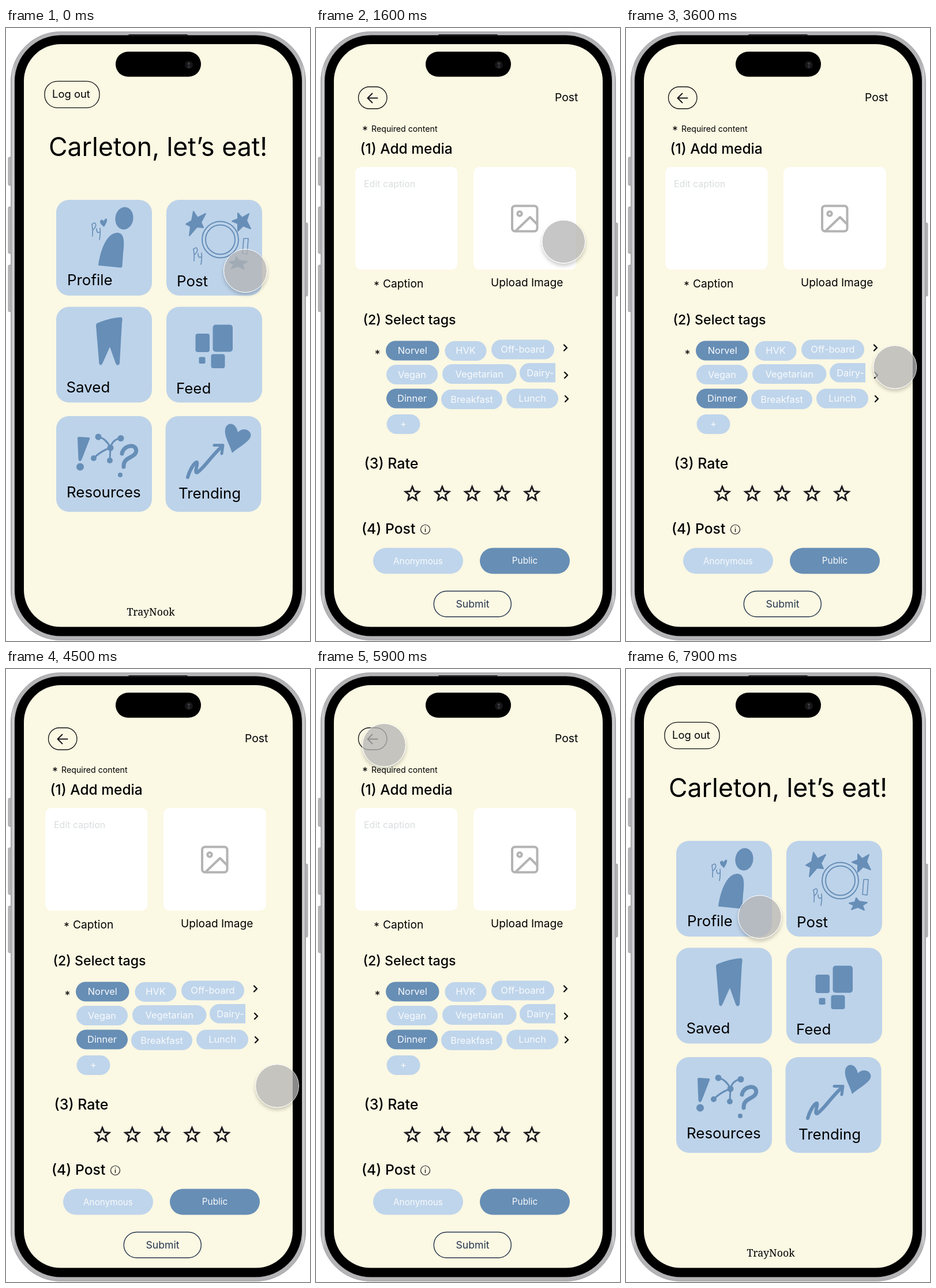
An HTML page that plays this animation: 527 px wide and 1063 px high, repeating every 8 s.

```html
<!DOCTYPE html>
<html lang="en">
<head>
<meta charset="utf-8">
<title>Campus dining app</title>
<style>
  html, body { margin: 0; width: 100%; height: 100%; overflow: hidden; background: #fff; }
  svg { position: absolute; left: 0; top: 0; display: block; }
  text { font-family: Inter, "Liberation Sans", sans-serif; white-space: pre; }
  .serif { font-family: "Noto Serif", "Liberation Serif", serif; }
  .line { fill: none; stroke-linecap: round; stroke-linejoin: round; }
  #touch {
    position: absolute; left: -38px; top: -38px; width: 76px; height: 76px;
    box-sizing: border-box; border-radius: 50%; border: 1.5px solid #fff;
    background: rgba(181, 181, 181, .76); background-clip: padding-box;
    box-shadow: 0 4px 6px rgba(0, 0, 0, .2);
  }
</style>
</head>
<body>
<svg width="527" height="1063" viewBox="0 0 527 1063">
  <defs>
    <linearGradient id="metal">
      <stop offset="0" stop-color="#a3a3a5"/>
      <stop offset=".007" stop-color="#d5d5d7"/>
      <stop offset=".013" stop-color="#b4b4b6"/>
      <stop offset=".987" stop-color="#b4b4b6"/>
      <stop offset=".993" stop-color="#d5d5d7"/>
      <stop offset="1" stop-color="#a3a3a5"/>
    </linearGradient>
    <clipPath id="tagRow"><rect x="100" y="570" width="315" height="60"/></clipPath>
    <g id="py" class="line" stroke="#668eb7" stroke-width="1.6">
      <path d="M0 2 Q2 13 1 23 M0 3 C5 -4 11 3 2 12 M8 10 Q8 19 13 16 M14 9 Q15 18 13 29"/>
    </g>
  </defs>

  <g id="phone">
    <g fill="#b7b7b9" stroke="#929294" stroke-width=".8">
      <rect x="4" y="224" width="8" height="49" rx="2"/>
      <rect x="4" y="310" width="8" height="81" rx="2"/>
      <rect x="4" y="411" width="8" height="81" rx="2"/>
      <rect x="515" y="338" width="8" height="127" rx="2"/>
    </g>
    <rect x="8.5" y="6.5" width="511" height="1055" rx="86" fill="url(#metal)" stroke="#a0a0a2"/>
    <rect x="15" y="12.5" width="498" height="1042" rx="80"/>
    <rect x="212" y="11" width="103" height="3" rx="1.5" fill="#1c1c1e"/>
    <rect x="31" y="28" width="466" height="1010.5" rx="64" fill="#fbf8e3"/>
    <rect x="190" y="41" width="148" height="43.5" rx="21.7"/>
    <circle cx="317" cy="64" r="7" fill="#161618"/>
    <circle cx="317" cy="62" r="2" fill="#3f4046"/>
    <circle cx="317" cy="67" r="2" fill="#333439"/>
  </g>

  <g id="home">
    <rect x="67" y="92.3" width="95" height="46" rx="22" fill="none" stroke="#111" stroke-width="1.3"/>
    <g id="tiles" fill="#bdd3ea"></g>
    <g id="icons" fill="#668eb7">
      <ellipse cx="205" cy="330" rx="15.5" ry="19.5" transform="rotate(8 205 330)"/>
      <path d="M160 411 C164 384 174 357 192 355 C207 354 205 375 203 391 L201.5 413 Q201 416 198 415.500 L163 412 Q159.500 412 160 411Z"/>
      <path d="M170 345 C165 341 161 337 164 333.500 Q167 331 169.500 335 Q172 329 175 331 C176 336 172 341 170 345Z"/>
      <use href="#py" x="149" y="338"/>
      <use href="#py" x="325" y="381"/>
      <g stroke="#668eb7" stroke-width="2" stroke-linejoin="round">
        <path d="M325 318 L332 329 L346 322 L338 337 L342 346 L331 345 L318 360 L320 344 L312 340 L322 334Z"/>
        <path d="M402 321 L409 329 L421 322 L417 334 L424 348 L411 343 L402 352 L402 339 L392 335 L402 331Z"/>
        <path d="M399 397 L404 403 L418 405 L410 410 L413 418 L402 413 L391 417 L395 410 L387 406 L397 404Z"/>
      </g>
      <g class="line" stroke="#668eb7" stroke-width="2">
        <circle cx="371.5" cy="367" r="31.5"/>
        <circle cx="371.5" cy="367" r="25.5"/>
        <path d="M412 365 L420 365 L418 392 L410 391Z" stroke-width="1.6"/>
      </g>
      <path d="M156 516 Q156 512 160 511 Q180 503 199 501.5 Q203 502 201 510 L197 582 Q193 588 190 581 L180 553 L168 580 Q164 588 161.500 582Z"/>
      <rect x="328.5" y="530" width="24.5" height="32" rx="4"/>
      <rect x="358.5" y="514.5" width="34.5" height="47" rx="5"/>
      <rect x="334.5" y="570.5" width="11" height="11.5" rx="2"/>
      <rect x="355.5" y="565.5" width="24" height="24.5" rx="4"/>
      <path d="M124 711 Q124 709 127 709 L143 710 Q146 710 145 713 L131 749 Q127 754 125.500 748Z"/>
      <circle cx="128.5" cy="761" r="6.5"/>
      <circle cx="160" cy="709" r="5.5"/>
      <circle cx="199" cy="711.5" r="5.5"/>
      <circle cx="181" cy="728" r="5.5"/>
      <circle cx="152" cy="746" r="5"/>
      <circle cx="180" cy="750" r="5"/>
      <circle cx="198" cy="775" r="4"/>
      <g class="line" stroke="#668eb7">
        <path stroke-width="3" d="M160 709 Q174 712 181 728 L180 750 M199 711 Q184 714 181 728 Q165 733 152 746"/>
        <path stroke-width="7" d="M201 738 C204 722 228 720 225.500 735 C223 746 203 743 204 761"/>
        <path stroke-width="6" d="M315 779 C318 767 327 752 331 753 C333 757 326 771 331 771 C341 766 355 743 374 726"/>
        <path stroke-width="5" d="M361 723.500 L376 723.500 L374 738"/>
      </g>
      <path d="M392 737 C387 719 376 706 381 692 C387 682 399 686 402 701 C410 692 424 696 424.500 706 C424 717 404 726 392 737Z"/>
    </g>
  </g>

  <g id="post">
    <rect x="73.5" y="102" width="49.5" height="38" rx="19" fill="none" stroke="#111" stroke-width="1.3"/>
    <path class="line" d="M106.500 121.500 H90 M97.500 113.500 L89.500 121.500 L97.500 129.500" stroke="#1d1b20" stroke-width="2"/>
    <g fill="#fff">
      <rect x="68" y="241" width="177.5" height="178" rx="10"/>
      <rect x="273" y="241" width="178" height="178" rx="10"/>
    </g>
    <g class="line" stroke="#b3b3b3" stroke-width="4">
      <rect x="340" y="308.5" width="43.5" height="44" rx="5"/>
      <circle cx="353" cy="322" r="3.7"/>
      <path d="M346 352 L371 328 L383 340"/>
    </g>
    <g id="pills"></g>
    <path class="line" id="chevrons" stroke="#111" stroke-width="2.4"/>
    <g id="stars" fill="none" stroke="#1d1b20" stroke-width="2.8" stroke-miterlimit="10"></g>
    <circle cx="189.5" cy="869.5" r="8" fill="none" stroke="#1d1b20" stroke-width="1.2"/>
    <path class="line" d="M189.500 868.500 V873.500 M189.500 865.500 V865.600" stroke="#1d1b20" stroke-width="1.4"/>
    <rect x="204.3" y="976.5" width="134" height="44.5" rx="22" fill="none" stroke="#26364f" stroke-width="1.4"/>
  </g>
</svg>
<div id="touch"></div>

<script>
const LOOP = 8000, STEP = 100;
const OPEN_POST = 400, BACK_HOME = 6500;
const DARK = '#678eb5', LIGHT = '#bfd5eb';

const byId = id => document.getElementById(id);

function add(parent, tag, attrs, content) {
  const el = document.createElementNS('http://www.w3.org/2000/svg', tag);
  for (const key in attrs) el.setAttribute(key, attrs[key]);
  if (content) el.textContent = content;
  parent.appendChild(el);
  return el;
}

const label = (parent, content, x, y, size, more = {}) =>
  add(parent, 'text', { x, y, 'font-size': size, ...more }, content);

const centered = { 'text-anchor': 'middle' };
const home = byId('home'), post = byId('post');

// Home screen
label(home, 'Log out', 80, 120.5, 18.4);
label(home, 'Carleton, let’s eat!', 74, 221.5, 44.6);
label(home, 'TrayNook', 251, 1019, 17.8, { ...centered, class: 'serif' });
[
  ['Profile', 87, 298, 106, 446],
  ['Post', 278, 298, 296, 448],
  ['Saved', 87, 483.5, 104.5, 631.5],
  ['Feed', 278, 483.5, 295, 634],
  ['Resources', 87, 673, 105, 814],
  ['Trending', 276.5, 673, 299, 815.5]
].forEach(([name, x, y, textX, base]) => {
  add(byId('tiles'), 'rect', { x, y, width: 166, height: 166, rx: 22 });
  label(home, name, textX, base, 25.9);
});

// Post screen
label(post, 'Post', 414, 126.5, 19.3);
label(post, 'Required content', 96, 179.5, 14.2);
[[85, 184], [105, 453], [106.5, 572]].forEach(([x, y]) => label(post, '*', x, y, 19, centered));
[
  ['(1) Add media', 76.5, 218, 24.5],
  ['(2) Select tags', 81.5, 514, 23.2],
  ['(3) Rate', 83.5, 764, 25],
  ['(4) Post', 79, 877, 24.7]
].forEach(([title, x, y, size]) => label(post, title, x, y, size, { 'font-weight': 500 }));
label(post, 'Edit caption', 83, 276, 16, { fill: '#d9dddf' });
label(post, 'Caption', 116, 449.5, 19.2);
label(post, 'Upload Image', 303, 448, 19.1);
label(post, 'Submit', 271.5, 1004.5, 17.7, { ...centered, fill: '#26364f' });

// name, left, top, width, height, baseline, fill, text size
[
  ['Norvel', 121, 542.5, 92.5, 34, 564.5, DARK],
  ['HVK', 223.5, 543, 72, 34, 564.5, LIGHT],
  ['Off-board', 304, 540.5, 109, 34, 563, LIGHT],
  ['Vegan', 122, 584, 89, 34, 607, LIGHT],
  ['Vegetarian', 219, 583, 128.5, 34, 606, LIGHT],
  ['Dairy-', 353, 581, 72, 33.5, 603.5, LIGHT],
  ['Dinner', 122, 625.5, 89, 34, 648, DARK],
  ['Breakfast', 217, 627, 106, 34, 650, LIGHT],
  ['Lunch', 330, 625.5, 90, 34, 648, LIGHT],
  ['+', 122.5, 670, 58, 34, 692, LIGHT],
  ['Anonymous', 99, 901.5, 156, 45, 930, LIGHT, 15.3],
  ['Public', 284, 901.5, 156, 45, 929, DARK, 15.3]
].forEach(([name, x, y, width, height, base, fill, size = 16.4]) => {
  const clipped = x < 415 && x + width > 421 && height < 34;
  const pill = add(byId('pills'), 'g', clipped ? { 'clip-path': 'url(#tagRow)' } : {});
  add(pill, 'rect', { x, y, width: clipped ? width + 40 : width, height, rx: height / 2, fill });
  label(pill, name, x + width / 2, base, size, { ...centered, fill: '#f8fafc' });
});

byId('chevrons').setAttribute('d', [[430, 554.5], [431, 602], [432, 643]]
  .map(([x, y]) => `M${x} ${y - 5} l5 5 l-5 5`).join(''));

for (let i = 0; i < 5; i++) {
  const points = Array.from({ length: 10 }, (_, k) => {
    const r = k % 2 ? 5.6 : 12.6, a = k * Math.PI / 5;
    return [167 + 51.8 * i + r * Math.sin(a), 808 - r * Math.cos(a)].map(v => v.toFixed(2));
  });
  add(byId('stars'), 'polygon', { points: points.join(' ') });
}

// Touch point path: time, x, y
const path = [
  [0, 415, 421], [400, 413, 424], [1000, 404, 441], [1500, 425, 385],
  [2000, 446, 312], [2300, 449, 298], [2700, 465, 375], [3200, 467, 500],
  [3700, 466, 610], [4100, 474, 695], [4500, 470, 723], [4800, 425, 620],
  [5400, 179, 219], [5700, 112, 128], [5900, 118, 132], [6300, 118, 128],
  [6500, 140, 123], [6800, 194, 122], [7200, 215, 202], [7300, 215, 202],
  [7600, 228, 345], [7900, 232, 430]
];

function touchAt(t) {
  const next = path.findIndex(p => p[0] > t);
  if (next < 0) return path[path.length - 1].slice(1);
  const [t0, x0, y0] = path[next - 1], [t1, x1, y1] = path[next];
  const k = (t - t0) / (t1 - t0);
  return [x0 + (x1 - x0) * k, y0 + (y1 - y0) * k];
}

const start = performance.now();

function draw() {
  const elapsed = (performance.now() - start) % LOOP;
  const t = Math.floor(elapsed / STEP) * STEP;
  const posting = t >= OPEN_POST && t < BACK_HOME;
  home.style.display = posting ? 'none' : '';
  post.style.display = posting ? '' : 'none';
  const [x, y] = touchAt(t);
  byId('touch').style.transform = `translate(${x}px, ${y}px)`;
  requestAnimationFrame(draw);
}
draw();
</script>
</body>
</html>
```
